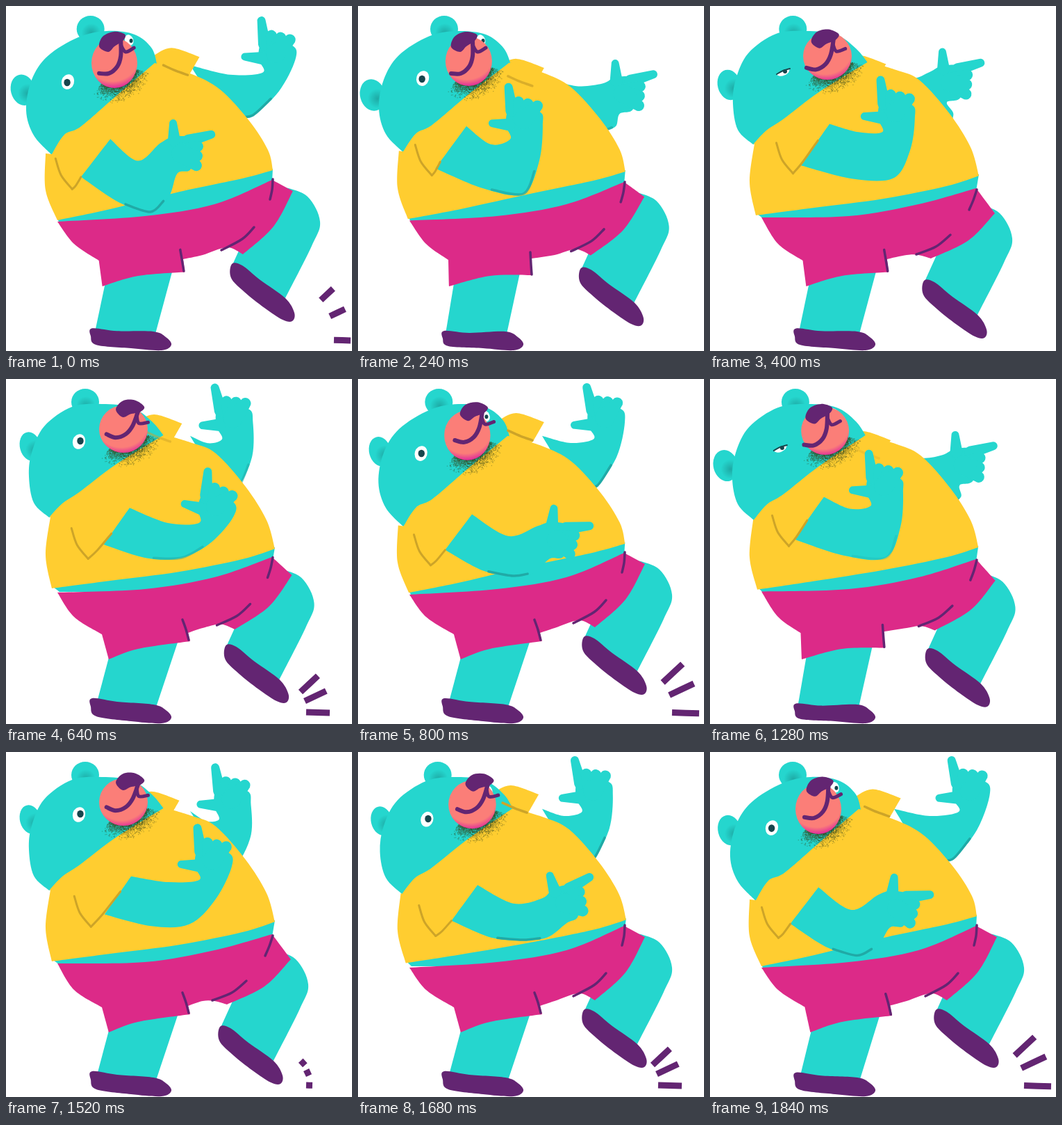
Recreate the animation shown at these times as an HTML page with a canvas. Size 498 px wide and 496 px high, loop 1.92 s.

```html
<!DOCTYPE html>
<html lang="en">
<head>
<meta charset="utf-8">
<title>Dancing bear</title>
<style>
html, body { margin: 0; width: 100%; height: 100%; overflow: hidden; background: #fff; }
canvas { display: block; }
</style>
</head>
<body>
<canvas id="stage" width="498" height="496"></canvas>
<script>
const c = document.getElementById('stage').getContext('2d');
const TEAL = '#25d6ce', SHADE = '#20aaa6', YELLOW = '#ffcd30', FOLD = '#cda428';
const PINK = '#dc2a88', PURPLE = '#632572', DARK = '#17464d';
const STEP = 80, CYCLE = 960;

let seed = 7;
const rnd = () => (seed = seed * 16807 % 2147483647) / 2147483647;
const specks = Array.from({ length: 1500 }, () => [Math.PI * (.08 + .62 * rnd()), .95 + .65 * rnd() * rnd()]);

const mix = (a, b, k) => a.map((v, i) => v + (b[i] - v) * k);
const add = (a, x, y) => [a[0] + x, a[1] + y];
const smooth = u => (u = Math.max(0, Math.min(1, u)), u * u * (3 - 2 * u));

// Motion rules over one dance cycle: a swing around a middle, and an eased rise and fall.
const wave = (t, mid, size, peak) => mid + size * Math.cos(2 * Math.PI * (t - peak) / CYCLE);
function pulse(t, rise, top, fall, end) {
  const u = (t - rise + CYCLE) % CYCLE;
  return smooth(u / (top - rise)) * (1 - smooth((u + rise - fall) / (end - fall)));
}

// Smooth curve through flat x,y points; listed corners stay sharp.
function trace(flat, corners = [], open = false) {
  const n = flat.length / 2;
  const at = i => flat.slice(2 * (i % n), 2 * (i % n) + 2);
  const sharp = i => corners.includes(i % n) || open && i % (n - 1) === 0;
  c.beginPath();
  c.moveTo(...at(0));
  for (let i = 0; i < (open ? n - 1 : n); i++) {
    const a = at(i), b = at(i + 1);
    const before = sharp(i) ? a : at(i + n - 1), after = sharp(i + 1) ? b : at(i + 2);
    c.bezierCurveTo(a[0] + (b[0] - before[0]) / 6, a[1] + (b[1] - before[1]) / 6,
      b[0] - (after[0] - a[0]) / 6, b[1] - (after[1] - a[1]) / 6, ...b);
  }
}
function shape(flat, color, corners) {
  trace(flat, corners);
  c.fillStyle = color;
  c.fill();
}
function line(flat, color, width, cap = 'round') {
  trace(flat, [], true);
  c.strokeStyle = color;
  c.lineWidth = width;
  c.lineCap = cap;
  c.stroke();
}
function oval(x, y, rx, ry, color, turn = 0) {
  c.beginPath();
  c.ellipse(x, y, rx, ry, turn, 0, 7);
  c.fillStyle = color;
  c.fill();
}
function glow(x, y, r) {
  const g = c.createRadialGradient(x, y, 0, x, y, r);
  g.addColorStop(0, '#1c9f9bcc');
  g.addColorStop(1, '#1c9f9b00');
  oval(x, y, r, r, g);
}
function finger([x, y], r, [tx, ty], tr) {
  const a = Math.atan2(ty - y, tx - x), q = Math.PI / 2;
  c.beginPath();
  c.arc(x, y, r, a + q, a - q);
  c.arc(tx, ty, tr, a - q, a + q);
  c.fillStyle = TEAL;
  c.fill();
}

// An arm leaves the sleeve between two hem points and ends in a rigid, turning hand.
function arm({ top, bottom, palm, angle, elbow, sag }, shade) {
  const a = angle * Math.PI / 180, sin = Math.sin(a) * .93, cos = Math.cos(a) * .93;
  const local = (x, y) => add(palm, x * cos - y * sin, x * sin + y * cos);
  const wrist = local(-20, 30), heel = local(30, 10);
  const dx = elbow[0] - heel[0], dy = elbow[1] - heel[1], len = Math.hypot(dx, dy);
  const forearm = add(mix(heel, elbow, .5), 9 * dy / len, -9 * dx / len);
  const under = add(mix(elbow, bottom, .45), 0, 9);
  shape([top, add(mix(top, wrist, .55), 0, sag), wrist, local(-27, 8), local(-19, -18), local(25, -12),
    heel, forearm, elbow, under, bottom].flat(), TEAL, [0, 10]);
  finger(local(-18, -14), 9, local(-23, -50), 6);
  finger(local(-22, 8), 9, local(-48, 6), 5.5);
  for (const i of [-1, 0, 1]) finger(palm, 14, local(7 + 14.5 * i, -24 + 3 * i), 8);
  c.globalAlpha = shade;
  line([...mix(elbow, under, .8), ...elbow, ...mix(elbow, forearm, .7)], SHADE, 3.5);
  c.globalAlpha = 1;
}

function frontArm(t) {
  return {
    top: [wave(t, 164, 16, 560), wave(t, 182, 13, 840)],
    bottom: [wave(t, 123, 19, 580), wave(t, 238, 9, 880)],
    palm: [wave(t, 268, -34, 165), 153 + 78 * pulse(t, 530, 790, 790, 1320)],
    angle: 92 * pulse(t, 600, 780, 920, 1120),
    elbow: [wave(t, 238, -30, 0), wave(t, 270, 26, 0)],
    sag: wave(t, 16, 12, 0)
  };
}
function backArm(t) {
  const x = wave(t, 360, 36, 100), y = 56 + 70 * pulse(t, 900, 1130, 1240, 1620);
  return {
    top: [265, 66 + .28 * y],
    bottom: [300, 140],
    palm: [x, y],
    angle: -6 + 88 * pulse(t, 930, 1110, 1380, 1540),
    elbow: [238 + .3 * x, 133 + .36 * y],
    sag: 8
  };
}

function backSleeve(t, shade) {
  const tip = [wave(t, 264, 15, 40), wave(t, 75, 14, 260)], hem = add(tip, -16, 28);
  return {
    fill: () => shape([...add(tip, -66, -2), ...add(tip, -40, -13), ...tip, ...hem, 222, 108], YELLOW, [0, 2, 3, 4]),
    crease: () => {
      c.globalAlpha = shade;
      line([...add(hem, -36, -16), ...add(hem, -18, -8), ...add(hem, -1, -2)], FOLD, 3.5);
      c.globalAlpha = 1;
    }
  };
}
function frontFold(t, end) {
  const tip = [wave(t, 109, 14, 510), wave(t, 254, 14, 830)];
  line([...add(tip, -24, -44), ...add(tip, -16, -20), ...tip], FOLD, 3);
  line([...tip, ...add(mix(tip, end, .4), 0, 2), ...end], FOLD, 3);
}

// m: head and shirt move, d: raised leg drops, s: shorts swing.
function legs(d, s) {
  c.save();
  c.translate(-17 * d, 24 * d);
  shape([400,260, 434,274, 452,310, 440,345, 402,420, 326,372, 345,330], TEAL, [0, 4, 5, 6]);
  shape([325,371, 340,373, 366,394, 402,420, 415,441, 412,453, 398,451, 372,434, 343,411, 324,391], PURPLE);
  c.restore();
  shape([139 + 11 * s, 393, 236 + 14 * s, 370, 214 + 2 * s, 472, 126 + 3 * s, 472], TEAL, [0, 1, 2, 3]);
  shape([124,467 - 8 * s, 160,470 - 6 * s, 212,468, 230,476, 238,487, 224,495, 180,492, 130,489 - 4 * s, 122,478 - 7 * s], PURPLE);
}

function shorts(d, s) {
  shape([74,310 - 6 * d, 200,302, 300,285, 383,250 + 12 * d, 413 - 3 * d,266 + 32 * d, 385 - 13 * d,317 + 20 * d,
    341 - 23 * d,357 + 6 * d, 318 - 18 * d,347 + 11 * d, 283,358, 249 + 13 * s,363 + 2 * s,
    251 + 14 * s,387 - 10 * s, 190,388, 131 + 17 * s,403, 130 + 8 * s,365 + 2 * s, 98,342], PINK, [0, 3, 4, 6, 9, 10, 12, 13]);
  line([384,249 + 15 * d, 383 - 4 * d,264 + 15 * d, 380 - 7 * d,278 + 15 * d], PURPLE, 3.5);
  line([357 - 11 * d,318 + 11 * d, 340 - 15 * d,335 + 11 * d, 310 - 13 * d,351 + 6 * d], PURPLE, 3.5);
  line([248 + 6 * s,354 - 8 * s, 249 + 10 * s,372 - 12 * s, 250 + 13 * s,386 - 11 * s], PURPLE, 3.5);
}

function head(m, lean) {
  const [lx, ly, lrx, lry] = mix([21, 128, 18, 23], [35, 97, 15, 21], lean), rx = 124 - 10 * lean;
  oval(lx, ly, lrx, lry, TEAL, -.25);
  glow(lx + 7, ly + 5, 14);
  oval(rx, 33, 20, 19, TEAL);
  glow(rx + 1, 39, 14);
  shape([66 - 4 * m,214 - 15 * m, 40,186 - 8 * m, 29 + 4 * m,150 - 10 * m, 37,106, 60 - 5 * m,72 - 4 * m, 104 - 9 * m,45 - 5 * m,
    145 - 7 * m,36, 185 - 4 * m,41, 210,61, 218 + 11 * m,88 - 4 * m, 140,170], TEAL, [0, 9, 10]);
}

function shirt(m) {
  shape([66 - 4 * m,213 - 14 * m, 84 - 3 * m,185 - 6 * m, 108 - 3 * m,173 - 10 * m, 160 - 2 * m,128 - 5 * m,
    214 + 14 * m,82 - 2 * m, 265 + 3 * m,97 - 5 * m, 308 - 6 * m,120 - 13 * m, 350 - 5 * m,165 - 10 * m,
    377 - 2 * m,207 - 4 * m, 384 + 3 * m,236 + 8 * m, 340,248 + 11 * m, 250,267 + 10 * m, 150,292 - 2 * m,
    74 - 8 * m,308 - 7 * m, 57,265 - 12 * m, 57 + 7 * m,212 - 14 * m], YELLOW, [0, 4, 9, 13, 15]);
}

function eye(x, y, turn, blink) {
  if (!blink) {
    oval(x, y, 9, 11, '#fff', .3);
    oval(x - 1 + 3 * turn, y + 1 - 2 * turn, 4.7, 5.3, DARK);
    return;
  }
  c.beginPath();
  c.ellipse(x, y + 4, 10, 6, -.4, 0, Math.PI);
  c.fillStyle = '#fff';
  c.fill();
  oval(x + 3, y + 4, 3, 3, DARK);
  line([x - 9, y + 8, x, y + 3, x + 10, y], DARK, 2);
}

function face(m, turn, blink) {
  const [ex, ey, x, y, rx, ry] = mix([89, 109, 156, 82, 33, 36], [105, 90, 169, 72, 35, 34], m);
  eye(ex, ey, turn, blink);
  oval(177 + 12 * turn, 49 + 8 * turn, 6, 8, '#fff', -.4);
  oval(180 + 9 * turn, 50 + 8 * turn, 2.5, 3, DARK);

  c.fillStyle = '#3a4a2060';
  for (const [a, d] of specks) c.fillRect(x + Math.cos(a) * rx * d, y + Math.sin(a) * ry * d, 1.2, 1.2);
  const g = c.createRadialGradient(x - 3, y - 14, 20, x - 3, y - 14, 51);
  g.addColorStop(0, '#fb7e78');
  g.addColorStop(.65, '#fb7e78');
  g.addColorStop(.95, '#e02f9a');
  oval(x, y, rx, ry, g);

  // Nose and mouth slide and roll together.
  c.save();
  c.translate(153 + 26 * turn, 50 - 8 * turn);
  c.rotate(.36 * turn);
  shape([-19,9, -14,-6, 2,-13, 18,-9, 15,0, 3,8, -6,16], PURPLE);
  line([12,0, 12,22, 7,37, -5,47, -19,47], PURPLE, 6);
  line([12,6, 19,16, 31,10], PURPLE, 5);
  c.restore();
}

// Three tap marks shoot out from the toe, drawn on every second step.
function tapMarks(step) {
  const n = Math.floor(((step + 5) % 12 + 1) / 2);
  if (n > 3) return;
  const reach = [Math.max(0, 20 * (n - 1)), Math.min(64, 9 + 25 * n)];
  [[424, 450, -.75], [430, 463, -.44], [432, 479, .03]].forEach(([x, y, a]) =>
    line(reach.flatMap(r => [x + r * Math.cos(a), y + r * Math.sin(a)]), PURPLE, 9, 'butt'));
}

function draw(step) {
  const t = step * STEP;
  const d = pulse(t, 160, 400, 560, 720), m = pulse(t, 160, 400, 640, 840);
  const turn = pulse(t, 240, 560, 640, 980), s = pulse(t, 280, 540, 780, 1120);
  const front = frontArm(t), sleeve = backSleeve(t, 1 - d);
  c.fillStyle = '#fff';
  c.fillRect(0, 0, 498, 496);

  arm(backArm(t), 1 - d);
  sleeve.fill();
  head(m, (turn + s) / 2);
  legs(d, s);
  shape([74 - 6 * m,306 - 7 * m, 250,265, 384 + 3 * m,234 + 8 * m, 383,254 + 12 * m, 250,303, 77,312 - 6 * m], TEAL, [0, 2, 3, 5]);
  shirt(m);
  shorts(d, s);
  sleeve.crease();
  face(m, turn, step === 4 || step === 5);
  arm(front, 1 - d);
  frontFold(t, mix(front.bottom, front.top, .6 * d));
  tapMarks(step);
}

const start = performance.now();
function tick() {
  draw(Math.floor((performance.now() - start) % CYCLE / STEP));
  requestAnimationFrame(tick);
}
tick();
</script>
</body>
</html>
```
